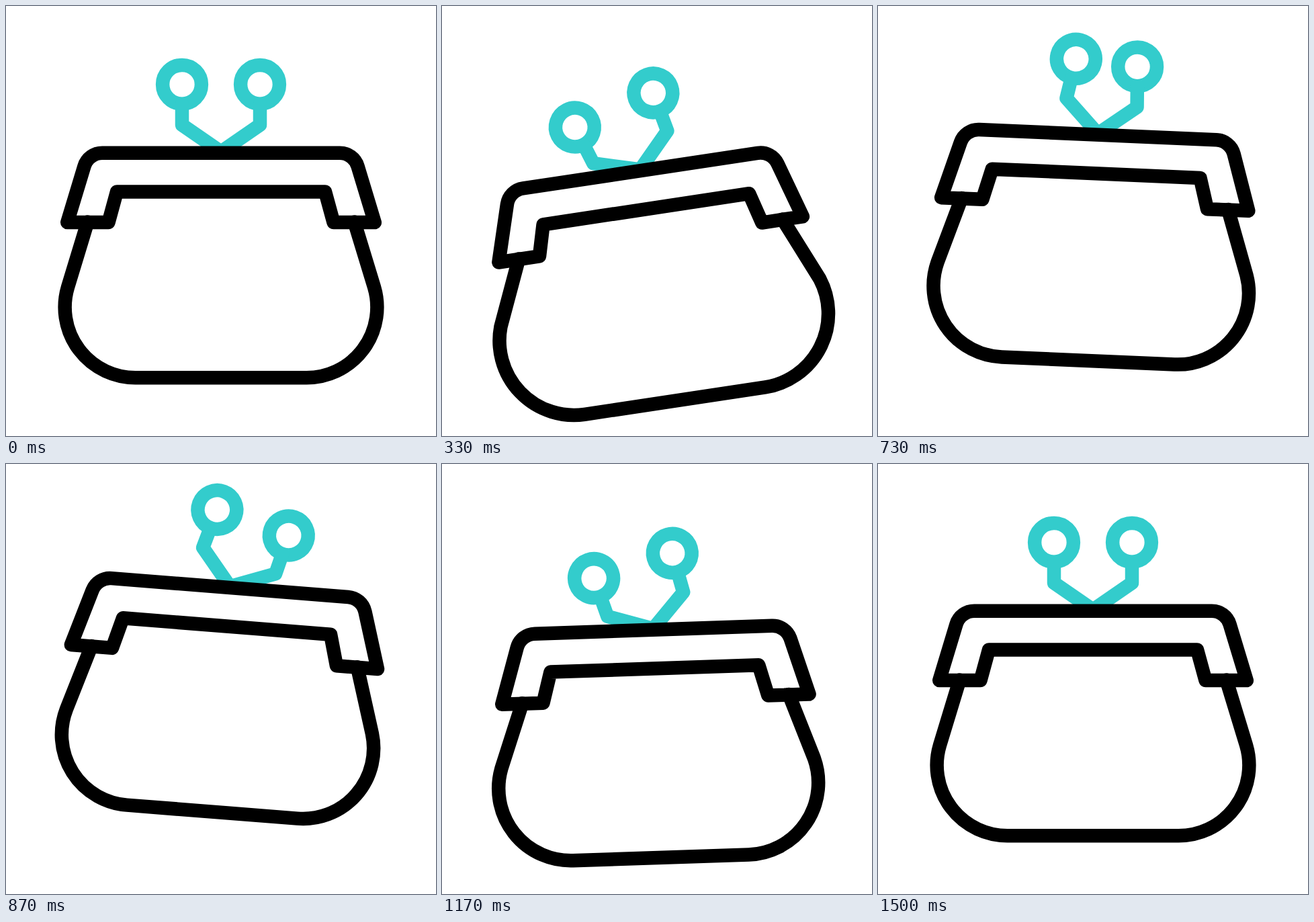
Animation of 640x640 px, one loop 2 s. Source, as an HTML page:

```html
<!DOCTYPE html>
<html lang="en">
<head>
<meta charset="utf-8">
<title>Coin purse</title>
<style>
  html, body { margin: 0; width: 100%; height: 100%; overflow: hidden; background: #fff; }
  svg { display: block; width: 100vw; height: 100vh; }
  #bag { fill: none; stroke: #000; stroke-width: 20.5; stroke-linecap: round; stroke-linejoin: round; }
  .arm { stroke: #3cc; }
  .bar { fill: #fff; }
</style>
</head>
<body>
<svg viewBox="0 0 640 640">
  <g id="bag">
    <g class="arm" id="left">
      <circle cx="262" cy="116.8" r="28.9"/>
      <path d="M262 146V177L320 217"/>
    </g>
    <g class="arm" id="right">
      <circle cx="378" cy="116.8" r="28.9"/>
      <path d="M378 146V177L320 217"/>
    </g>
    <path class="bar" d="M91.2 322.1L116.5 238.5A28 28 0 0 1 143.5 218.7H496.5A28 28 0 0 1 523.5 238.5L548.8 322.1H487.5L475 276.4H165L152.5 322.1Z"/>
    <path id="pouch"/>
  </g>
</svg>
<script>
const FPS = 30, LOOP = 2000;
const KEYS = [0, 13, 25, 34, 42];
const LAG = 3;

// Values at each key
const DROP  = [0, 28.5, -37.5, 29.2, 0];
const TILT  = [0, -9.9, 4.75, -2, 0];
const PUFF  = [0, 1.16, 0, 0.43, 0];
const SWING = [0, -21.3, 17.4, -18.5, 0];

const [bag, left, right, pouch] =
  ['bag', 'left', 'right', 'pouch'].map(id => document.getElementById(id));

const ease = u => u * u * (3 - 2 * u);

function sample(values, f) {
  const last = KEYS.length - 1;
  if (f <= 0) return values[0];
  if (f >= KEYS[last]) return values[last];
  const i = KEYS.findIndex(k => k > f) - 1;
  const u = (f - KEYS[i]) / (KEYS[i + 1] - KEYS[i]);
  return values[i] + (values[i + 1] - values[i]) * ease(u);
}

function pouchPath(k) {
  const sideX = 228 + 12 * k, sideY = 418.4 - k;
  const baseX = 127 + 9 * k, baseY = 553.2 + 11.7 * k;
  const r = 104.9 + 6 * k;
  const arc = `A${r} ${r} 0 0 0`;
  return `M121.5 321.6L${320 - sideX} ${sideY}${arc} ${320 - baseX} ${baseY}` +
    `H${320 + baseX}${arc} ${320 + sideX} ${sideY}L518.5 321.6`;
}

function turn(arm, angle) {
  arm.setAttribute('transform', `rotate(${angle} 320 217)`);
}

function draw(ms) {
  // Hold each pose for a thirtieth of a second
  const f = Math.floor(ms * FPS / 1000 + 0.2);
  bag.setAttribute('transform',
    `translate(0 ${sample(DROP, f)}) rotate(${sample(TILT, f)} 320 385)`);
  turn(left, sample(SWING, f));
  turn(right, sample(SWING, f - LAG));
  pouch.setAttribute('d', pouchPath(sample(PUFF, f)));
}

const start = performance.now();
function tick() {
  draw((performance.now() - start) % LOOP);
  requestAnimationFrame(tick);
}
tick();
</script>
</body>
</html>
```
